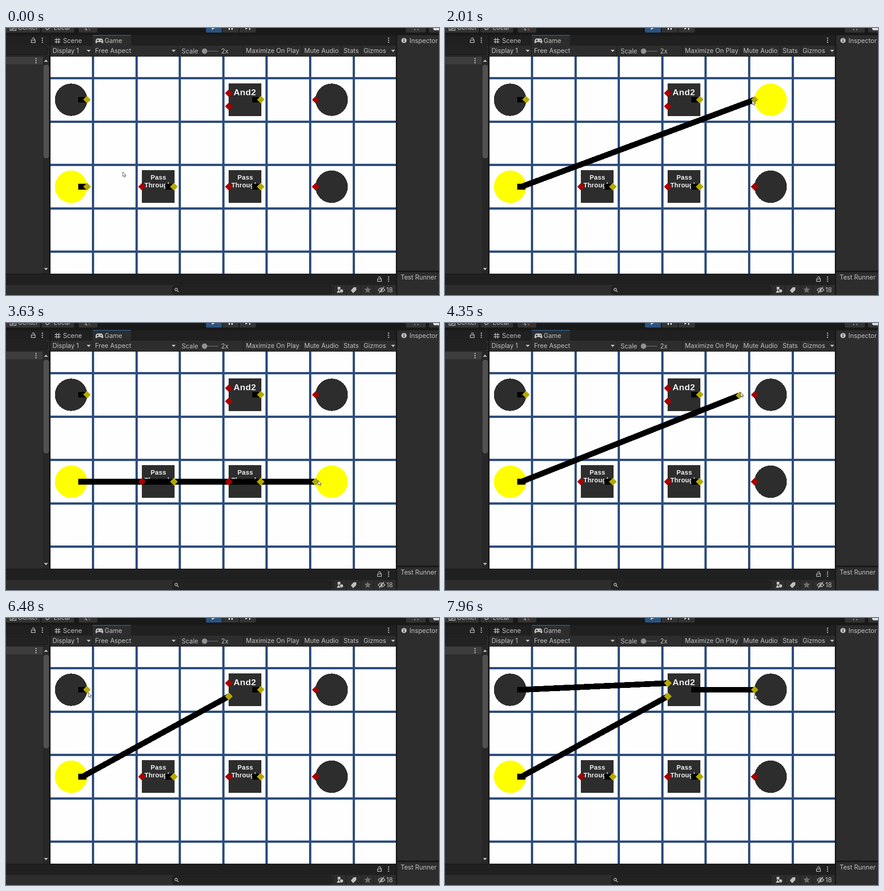
These frames come from a looping animation (953 by 588 pixels, 8 s). An HTML page:

```html
<!DOCTYPE html>
<html lang="en">
<head>
<meta charset="utf-8">
<title>Logic gate wiring</title>
<style>
  html, body { margin: 0; width: 100%; height: 100%; overflow: hidden; background: #191919; }
  svg { display: block; }
  text { font: 14px Inter, sans-serif; fill: #c2c2c2; }
  .label { font: bold 14.2px "Liberation Sans", Arial, sans-serif; letter-spacing: .3px; fill: #eee; text-anchor: middle; }
  .title { font-size: 19.2px; letter-spacing: .5px; }
  .icon { fill: none; stroke: #c0c0c0; stroke-width: 1.4; }
  .solid { fill: #c0c0c0; }
  .rule { stroke: #1b1b1b; }
  .field { fill: #222; stroke: #161616; }
  .wire { fill: none; stroke: #000; stroke-width: 12.6; }
</style>
</head>
<body>
<svg width="953" height="588" viewBox="0 0 953 588">
  <defs>
    <g id="lock" class="icon">
      <rect x="-4.3" y="-.5" width="8.6" height="5.5"/>
      <path d="M-2.5-3.2a2.6 2.6 0 0 1 5.1.2V-.5"/>
    </g>
    <g id="dots" class="solid">
      <circle cy="-4.6" r="1.4"/><circle r="1.4"/><circle cy="4.6" r="1.4"/>
    </g>
    <path id="down" class="solid" d="M-4.5-2.5h9L0 2.5z"/>
    <clipPath id="view"><rect x="98" y="63" width="760" height="478"/></clipPath>
  </defs>

  <!-- main toolbar -->
  <g fill="#333">
    <path d="M0 0h75v7q0 3-3 3H0zM78 0h72v7q0 3-3 3H81q-3 0-3-3zM160 0h41v7q0 3-3 3h-35q-3 0-3-3z"/>
    <path d="M477 0h35v10h-35zM514 0h36v7q0 3-3 3h-33zM880 0h44v7q0 3-3 3h-38q-3 0-3-3zM931 0h22v10h-19q-3 0-3-3z"/>
  </g>
  <path d="M440 0h35v10h-32q-3 0-3-3z" fill="#2c5480"/>
  <text x="26" y="4">Center</text>
  <text x="105" y="4">Local</text>
  <path class="icon" d="M9 0v5h13V0M12 3l7-3M87 0l3 4 6-3M176 0v4h3"/>
  <path class="icon" d="M183 0v4h3M171 2l3 2" style="stroke:#a85a4c"/>
  <path d="M453 0h7l-7 4zM490 0h3v4h-3zM496 0h3v4h-3zM527 0h5l-5 4zM535 0h2.500v4H535z" fill="#ddd"/>
  <path d="M898 2h3v3h-3zM905 2h3v3h-3z" fill="#777"/>
  <path d="M940 0h13v5h-9q-4 0-4-5z" fill="#ddd"/>

  <!-- left panel -->
  <rect y="16" width="95" height="23" fill="#202020"/>
  <rect y="39" width="95" height="502" fill="#2d2d2d"/>
  <path class="field" d="M0 40.500h87q5 0 5 5v9q0 5-5 5H0"/>
  <path class="rule" d="M0 62.500h95"/>
  <rect y="63" width="81" height="17" fill="#3d3d3d"/>
  <rect x="81" y="63" width="14" height="478" fill="#272727"/>
  <rect x="82.500" y="81" width="12" height="206" rx="5" fill="#515151"/>
  <use href="#lock" x="60" y="27"/>
  <use href="#dots" x="80" y="27"/>
  <use href="#dots" x="66" y="72"/>
  <use href="#down" transform="translate(88 72) scale(1 -1)"/>
  <use href="#down" x="88" y="531"/>

  <!-- game window header -->
  <rect x="98" y="16" width="760" height="23" fill="#202020"/>
  <rect x="191" y="16" width="84" height="23" fill="#2d2d2d"/>
  <rect x="191" y="15.500" width="84" height="1.500" fill="#2f659b"/>
  <rect x="98" y="39" width="760" height="23" fill="#2d2d2d"/>
  <path class="rule" d="M190.500 39v23M378.500 39v23M522.500 39v23M651.500 39v23M737.500 39v23M782.500 39v23"/>
  <path class="icon" d="M111 22v12M116 22v12M107 25.500h13M107 30.500h13"/>
  <path d="M201 23h9c4 0 5 10 3 10.500-2 .5-3-2.500-4-2.500h-7c-1 0-2 3-4 2.500-2-.5-1-10.500 3-10.500z" class="solid"/>
  <path d="M200 27.500h4M202 25.500v4M208 27.500h3" stroke="#2d2d2d" stroke-width="1.400"/>
  <text x="125.500" y="33">Scene</text>
  <text x="217" y="33">Game</text>
  <use href="#dots" x="842" y="27"/>
  <text x="102.500" y="55">Display 1</text>
  <use href="#down" x="182" y="50.500"/>
  <text x="196" y="55">Free Aspect</text>
  <use href="#down" x="369" y="50.500"/>
  <text x="386.500" y="55.500">Scale</text>
  <path d="M437 51h30" stroke="#5c5c5c" stroke-width="2"/>
  <circle cx="437" cy="51" r="6" fill="#929292"/>
  <text x="473.500" y="55.500">2x</text>
  <text x="528" y="55">Maximize On Play</text>
  <text x="656.500" y="55">Mute Audio</text>
  <text x="743" y="55">Stats</text>
  <text x="787" y="55">Gizmos</text>
  <use href="#down" x="852" y="50.500"/>

  <!-- right panel -->
  <rect x="861" y="16" width="92" height="518" fill="#2d2d2d"/>
  <rect x="861" y="538" width="92" height="50" fill="#2d2d2d"/>
  <circle cx="876" cy="27.500" r="5.800" class="solid"/>
  <path d="M876 26.500v4.500M876 23.500v1.700" stroke="#2d2d2d" stroke-width="1.800"/>
  <text x="888" y="33">Inspector</text>
  <text x="868.500" y="554">Test Runner</text>

  <!-- bottom panel -->
  <rect y="543" width="858" height="23" fill="#202020"/>
  <rect y="566" width="858" height="22" fill="#2d2d2d"/>
  <rect class="field" x="366.500" y="567.500" width="351" height="19" rx="5"/>
  <path class="rule" d="M721.500 566v22M748.500 566v22M781.500 566v22M809.500 566v22"/>
  <path class="icon" d="M371.800 576a2.700 2.700 0 1 1 5.400 0 2.700 2.700 0 1 1-5.400 0M376.500 578l3.500 3.500"/>
  <use href="#lock" x="822" y="553"/>
  <use href="#dots" x="842" y="553"/>
  <path class="solid" d="M730 570h6v6h-6zM728 583l4-7 4 7zM759 578l6-7h6v6l-7 7z"/>
  <circle cx="738.500" cy="579" r="3.500" class="solid"/>
  <path d="M796 569l2.200 5 5.300.5-4 3.600 1.200 5.400-4.700-2.800-4.700 2.800 1.200-5.400-4-3.600 5.300-.5z" fill="#707070"/>
  <path class="icon" d="M819 577q7-9 15 0-8 8-15 0M821 584l11-14"/>
  <circle cx="826.500" cy="577" r="2.400" class="solid"/>
  <text x="837" y="582">18</text>

  <g clip-path="url(#view)">
    <rect x="98" y="62" width="760" height="480" fill="#fefefe"/>
    <g id="board" shape-rendering="crispEdges"></g>
    <path id="cursor" d="M0 0v10l2.300-2 1.800 3.700 1.700-.8-1.700-3.500h3z" fill="#fff" stroke="#333" stroke-width=".9"/>
  </g>
</svg>
<script>
const LOOP = 8000, STEP = 120, SNAP = 18;
const CELL = 95.6, LINE = 5, RADIUS = 36;
const TOP = 158, BOTTOM = 349.5;
const SOURCE = 143.3, PASS = 334.5, GATE = 525.7, LAMP = 716.7;
const DARK = '#2d2d2d', LIT = '#ff0', RED = '#a80000', GOLD = '#b3a800', BLUE = '#2d4d7c';
const board = document.getElementById('board');
const cursor = document.getElementById('cursor');

function add(tag, attrs, text = '') {
  const el = document.createElementNS('http://www.w3.org/2000/svg', tag);
  for (const name in attrs) el.setAttribute(name, attrs[name]);
  el.textContent = text;
  return board.appendChild(el);
}
const bulb = (cx, cy, fill) => add('circle', { cx, cy, r: RADIUS - 0.3, fill });
const box = (x, y) =>
  add('rect', { x: x - RADIUS, y: Math.floor(y) - RADIUS, width: 2 * RADIUS, height: 2 * RADIUS, fill: DARK });
const label = (x, y, text, type = '') => add('text', { x, y, class: `label ${type}` }, text);
const moveTo = (el, { x, y }) => el.setAttribute('transform', `translate(${x} ${y})`);
function diamond(at, fill) {
  const el = add('path', { d: 'M-8.3 0L0-8.300 8.300 0 0 8.300z', fill });
  moveTo(el, at);
  return el;
}

// Sockets accept plugs; each wire leaves its part on the right-hand side.
const socket = (centre, y) => ({ x: centre - RADIUS + 0.7, y });
const lampSockets = [TOP, BOTTOM].map(y => socket(LAMP, y));
const sockets = [...lampSockets, socket(GATE, TOP - 14.5), socket(GATE, TOP + 14.5),
  socket(PASS, BOTTOM), socket(GATE, BOTTOM)];
const outlet = (centre, y) => ({ x: centre + RADIUS - 1, y });
const outlets = {
  on: outlet(SOURCE, BOTTOM), off: outlet(SOURCE, TOP), and: outlet(GATE, TOP),
  passA: outlet(PASS, BOTTOM), passB: outlet(GATE, BOTTOM)
};

const linear = k => k;
const easeOut = k => 1 - (1 - k) ** 3;

// Hand movements, each made of evenly timed steps; a drag carries a wire's plug along.
const moves = [];
const point = (start, steps, x, y, ease = easeOut, wire = null) => moves.push({ start, steps, x, y, ease, wire });
const drag = (wire, start, steps, x, y, ease = easeOut) => point(start, steps, x, y, ease, wire);

drag('on', 120, 1, 341, 293);
drag('on', 300, 7, 637, 190);
drag('on', 1150, 4, 670, 160);
point(2010, 2, 682, 158, linear);
point(2270, 1, 687, 155);
drag('on', 2530, 4, 628, 229);
drag('on', 3030, 7, 687, 347);
drag('on', 3870, 3, 622, 245);
drag('on', 4230, 4, 652, 147);
drag('on', 4710, 2, 679, 161);
drag('on', 5330, 4, 505, 183, linear);
drag('on', 5970, 1, 497, 174);
point(6120, 4, 181, 164);
drag('off', 6600, 3, 478, 148, linear);
drag('off', 6960, 1, 500, 148);
point(7080, 3, 562, 160);
drag('and', 7450, 2, 585, 160);
drag('and', 7720, 3, 681, 168, linear);

const mix = (a, b, k) => ({ x: a.x + (b.x - a.x) * k, y: a.y + (b.y - a.y) * k });
const snap = p => sockets.find(s => Math.hypot(s.x - p.x, s.y - p.y) < SNAP) || p;

function stateAt(time) {
  const plugs = { ...outlets };
  let hand = { x: 257, y: 317 }, tip = hand;
  for (const move of moves) {
    if (move.start > time) break;
    const step = Math.min(move.steps, Math.floor((time - move.start) / STEP) + 1);
    const from = hand;
    hand = mix(from, move, move.ease(step / move.steps));
    // The pointer runs half a step ahead of what it carries.
    tip = mix(from, move, move.ease(Math.min(1, (step + 0.5) / move.steps)));
    if (move.wire) plugs[move.wire] = snap(hand);
    else tip = hand;
  }
  return { plugs, tip };
}

for (let i = 0; i < 7; i++) add('rect', { x: 189 + i * CELL, y: 62, width: LINE, height: 480, fill: BLUE });
for (let i = 0; i < 5; i++) add('rect', { x: 98, y: 108 + i * CELL, width: 760, height: LINE, fill: BLUE });

bulb(SOURCE, TOP, DARK);
bulb(SOURCE, BOTTOM, LIT);
const lamps = lampSockets.map(({ y }) => bulb(LAMP, y, DARK));
box(GATE, TOP);
label(GATE, 148, 'And2', 'title');
for (const x of [PASS, GATE]) {
  box(x, BOTTOM);
  label(x + 1, 334, 'Pass');
  label(x, 351, 'Through');
}

const names = Object.keys(outlets);
const lines = names.map(() => add('path', { class: 'wire' }));
sockets.forEach(at => diamond(at, RED));
const ends = names.map(name => diamond(outlets[name], GOLD));

function draw(time) {
  const { plugs, tip } = stateAt(time);
  names.forEach((name, i) => {
    const { x, y } = outlets[name], plug = plugs[name];
    lines[i].setAttribute('d', `M${x - 19} ${y}h18M${x - 10} ${y}L${plug.x} ${plug.y}`);
    moveTo(ends[i], plug);
  });
  lamps.forEach((lamp, i) => lamp.setAttribute('fill', plugs.on === lampSockets[i] ? LIT : DARK));
  moveTo(cursor, tip);
}

const start = performance.now();
function tick(now) {
  draw(Math.max(0, now - start) % LOOP);
  requestAnimationFrame(tick);
}
draw(0);
requestAnimationFrame(tick);
</script>
</body>
</html>
```
